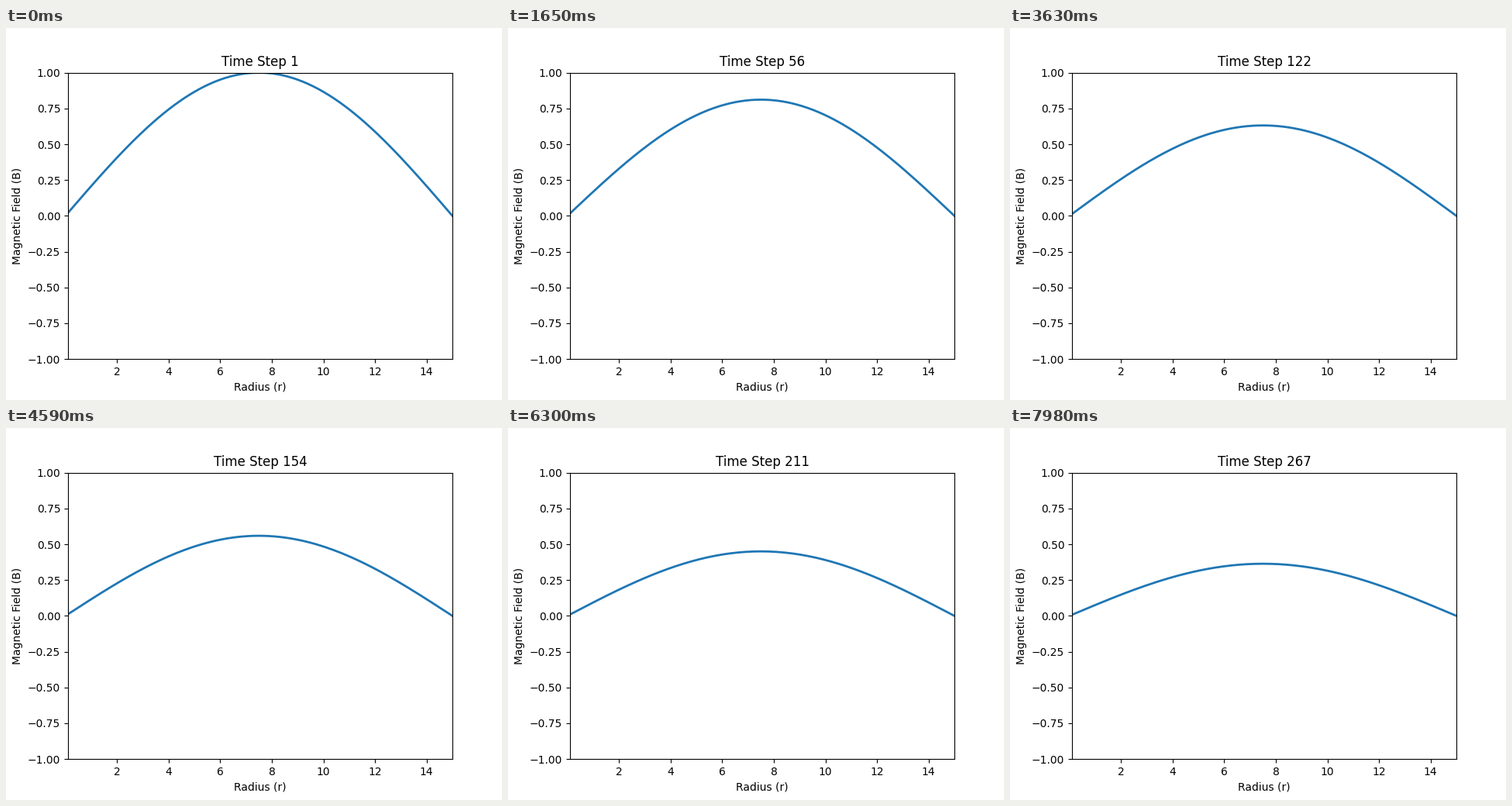
Recreate the animation shown at these times as a matplotlib script. Size 640 px wide and 480 px high, loop 8000 ms.

```python
import numpy as np
import matplotlib.pyplot as plt
from matplotlib.animation import FuncAnimation

R_MIN, R_MAX = 0.1, 15.0
DECAY = 0.0038      # amplitude loss per time step
STEP_MS = 30        # time each step is shown
INTERVAL = 20
FRAMES = 400        # 8 s loop

plt.rcParams["font.family"] = "DejaVu Sans"
fig, ax = plt.subplots(figsize=(6.4, 4.8), dpi=100)
r = np.linspace(R_MIN, R_MAX, 150)
profile = np.sin(np.pi * r / R_MAX)

line, = ax.plot(r, profile, lw=2, color="tab:blue")
ax.set_xlim(R_MIN, R_MAX)
ax.set_ylim(-1, 1)
ax.set_xlabel("Radius (r)")
ax.set_ylabel("Magnetic Field (B)")
title = ax.set_title("Time Step 1")


def update(frame):
    # the middle of the frame decides which step is on show
    step = int((frame + 0.5) * INTERVAL // STEP_MS)
    line.set_ydata(profile * np.exp(-DECAY * step))
    title.set_text(f"Time Step {step + 1}")
    return line, title


def init():
    return update(0)


anim = FuncAnimation(fig, update, frames=FRAMES, init_func=init,
                     interval=INTERVAL, repeat=True, repeat_delay=0)
plt.show()
```
